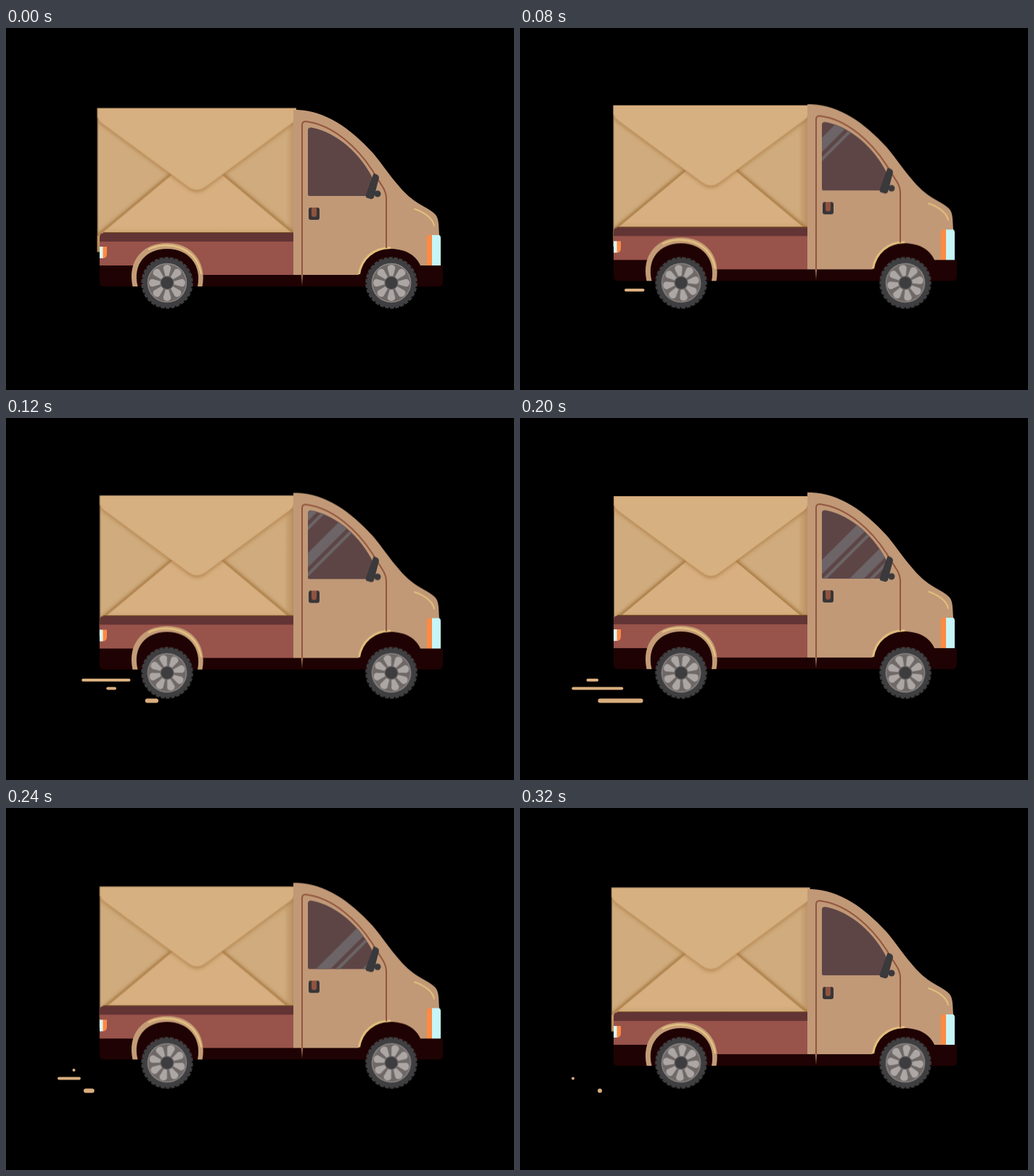
These frames come from a looping animation (700x500 px, 360 ms). An HTML page:

```html
<!DOCTYPE html>
<html lang="en">
<head>
<meta charset="utf-8">
<title>Delivery van</title>
<style>
  html, body { margin: 0; width: 100%; height: 100%; overflow: hidden; background: #000; }
  svg { display: block; width: 700px; height: 500px; }
</style>
</head>
<body>
<svg viewBox="0 0 700 500" fill="none">
  <defs>
    <linearGradient id="side">
      <stop offset="0" stop-color="#d0ab7d"/>
      <stop offset=".95" stop-color="#d0ab7d"/>
      <stop offset="1" stop-color="#b98f60"/>
    </linearGradient>
    <linearGradient id="fold" x2="0" y2="1">
      <stop offset="0" stop-color="#d8b081"/>
      <stop offset=".75" stop-color="#d7af80"/>
      <stop offset="1" stop-color="#b98c55"/>
    </linearGradient>
    <filter id="soft" x="-10%" y="-10%" width="120%" height="130%">
      <feGaussianBlur stdDeviation="2"/>
    </filter>
    <clipPath id="sheet"><path d="M129.500 107H396.500V301H129.500z"/></clipPath>
    <path id="glass" d="M416 141Q416 137 421 137.500C456 144 489 174 506 209L499 232H418Q416 232 416 230z"/>
    <clipPath id="pane"><use href="#glass"/></clipPath>
    <path id="flap" d="M129.500 107H396.500V119Q396 124 390 128L275 213Q263 222 251 213L136 128Q130 124 129.500 119z"/>
    <path id="petal" d="M-2.300 -9.500L-5.300 -20Q-5.500 -24.500 0 -25Q5.500 -24.500 5.300 -20L2.300 -9.500z"/>
  </defs>

  <g id="envelope">
    <g clip-path="url(#sheet)">
      <path d="M129.500 107H396.500V301H129.500z" fill="url(#side)"/>
      <path d="M129.500 279.500L263 168L396.500 279.500" stroke="#9a6a32" stroke-width="4" filter="url(#soft)"/>
      <path d="M263 168L396.500 279.500V301H129.500V279.500z" fill="url(#fold)" stroke="#b1824c"/>
      <use href="#flap" y="3" fill="#a9783f" opacity=".6" filter="url(#soft)"/>
      <use href="#flap" fill="#d7b081" stroke="#c0935f" stroke-width=".8"/>
    </g>
  </g>

  <g id="body">
    <!-- cargo bed and sill -->
    <path d="M129 290H397V341H129z" fill="#98534b"/>
    <path d="M129 295V289Q129 283 135 283H397V295z" fill="#633434"/>
    <path d="M134 282.500H397" stroke="#7a5427"/>
    <path d="M129 328H180V341H490L560 328H602V351Q602 357 596 357H135Q129 357 129 351z" fill="#1f0203"/>
    <path d="M129 302H139V312Q139 318 133 318H129z" fill="#ff8a43"/>
    <path d="M129 302H133.500V318H129z" fill="#d9f7f5"/>
    <!-- rear arch -->
    <path d="M174.500 357C167 323 187 297 222 297C256 297 277 323 270.500 357z" fill="#c49c77"/>
    <path d="M181.500 357C174 327 192 305 222 305C251 305 270 327 264 357z" fill="#1f0203"/>
    <path d="M196 306C222 293 262 301 269 340" stroke="#e4c17f" stroke-width="2.500"/>
    <!-- cab -->
    <path d="M396 113H401C440 114 475 139 505 172C523 193 540 222 562 238C575 247 586 251 592 258C597 264 596 276 597 286L599 328H570V341H396z" fill="#c19977"/>
    <path d="M486 341C490 318 507 305 530 305C550 305 565 314 571 328V345H486z" fill="#1f0203"/>
    <path d="M486.500 340C490 318 507 303.500 530 303.500" stroke="#e2bf7d" stroke-width="3"/>
    <path d="M408 342V134Q408 129 413 129C452 134 485 166 505 197L520 221Q524 228 524 236V304" stroke="#93553f" stroke-width="2"/>
    <path d="M406.800 341H409L408 356z" fill="#a87558"/>
    <path d="M563 250C575 254 588 262 590 273" stroke="#e2c07d" stroke-width="2" stroke-linecap="round"/>
    <path d="M587 286H596Q599 286 599 290V328H587z" fill="#c6f6f8"/>
    <path d="M580 290Q580 286 584 286H587V328H580z" fill="#ff8a43"/>
    <!-- window -->
    <use href="#glass" fill="#5d4546"/>
    <g clip-path="url(#pane)">
      <g id="glare" stroke="#6c6466"></g>
    </g>
    <path d="M506.500 201Q514 202 514 207L507 234Q505 237 502 236L497 234.500Q495 233 496 230z" fill="#3a393b"/>
    <circle cx="512" cy="229" r="4.500" fill="#3a393b"/>
    <rect x="417" y="248" width="15" height="17" rx="3" fill="#383537"/>
    <path d="M421 248H428V258Q428 261 424.500 261Q421 261 421 258z" fill="#91533f"/>
  </g>

  <g id="wheels"></g>
  <g id="trails" fill="#d9ae7e"></g>
</svg>
<script>
const STEP = 40, COUNT = 9;
const byId = id => document.getElementById(id);

function add(parent, tag, attrs) {
  const node = document.createElementNS('http://www.w3.org/2000/svg', tag);
  for (const key in attrs) node.setAttribute(key, attrs[key]);
  return parent.appendChild(node);
}

// Holds one pose per step, with hard changes between them.
function play(node, pose) {
  const frames = Array.from({ length: COUNT + 1 }, (_, i) => ({
    ...pose(Math.min(i, COUNT - 1)), offset: i / COUNT, easing: 'steps(1, end)'
  }));
  node.animate(frames, { duration: STEP * COUNT, iterations: Infinity });
}

function smooth(u) {
  const t = Math.min(1, Math.max(0, u));
  return t * t * (3 - 2 * t);
}

// Quick rise, a pause at the top, then a sharp drop.
const hop = i => i < 4 ? 1 - (1 - i / 4) ** 2 : 1 - ((i - 4) / 4.1) ** 4;

play(byId('body'), i => ({ transform: `translate(0px, ${-10.2 * hop(i)}px)` }));

// The envelope jumps at once, sinks back slowly and swells near the ground.
play(byId('envelope'), i => {
  const sink = (i + COUNT - 1) % COUNT / (COUNT - 1);
  const y = 106.5 + 4 * sink ** 1.5;
  const size = 1 + 0.026 * (1 - hop(i));
  return { transform: `translate(263px, ${y}px) scale(${size}) translate(-263px, -107px)` };
});

// Two reflections, each a wide band led by a thin one.
const glare = byId('glare');
for (const x of [0, -64]) {
  add(glare, 'path', { d: `M${x} 0l-300 300`, 'stroke-width': 14 });
  add(glare, 'path', { d: `M${x + 20} 0l-300 300`, 'stroke-width': 4 });
}
play(glare, i => ({ transform: `translate(${511 + 37 * i}px, 0px)` }));

for (const x of [222, 531]) {
  const hub = add(byId('wheels'), 'g', { transform: `translate(${x} 352)` });
  const wheel = add(hub, 'g', {});
  add(wheel, 'circle', { r: 34, fill: '#3f3f41' });
  add(wheel, 'circle', {
    r: 34.5, stroke: '#3f3f41', 'stroke-width': 2.5, pathLength: 120, 'stroke-dasharray': '3 1'
  });
  add(wheel, 'circle', { r: 26.5, fill: '#6e6866', stroke: '#8b8584', 'stroke-width': 1.5 });
  for (let a = 0; a < 360; a += 45)
    add(wheel, 'use', { href: '#petal', fill: '#aca6a5', transform: `rotate(${a})` });
  add(wheel, 'circle', { r: 8.5, fill: '#3d3d3f' });
  play(wheel, i => ({ transform: `rotate(${i * 360 / COUNT}deg)` }));
}

// The front of a trail shoots left; its back follows the same path after a lag.
function addTrail({ y, size, end, travel, start, lag }) {
  const bar = add(byId('trails'), 'rect', { y: y - size / 2, height: size, rx: size / 2 });
  play(bar, i => {
    const age = i - start;
    const front = smooth(age / 2.7), back = smooth((age - lag) / 2.7);
    return {
      x: `${end + travel * (1 - front)}px`,
      width: `${size + travel * (front - back)}px`,
      opacity: age > 0 && age < 6.5 ? 1 : 0
    };
  });
}
addTrail({ y: 362, size: 4, end: 91.5, travel: 76, start: 1, lag: 2 });
addTrail({ y: 373.5, size: 4, end: 71, travel: 77, start: 2.4, lag: 2 });
addTrail({ y: 390.5, size: 6, end: 107, travel: 97, start: 2.4, lag: 1.4 });
</script>
</body>
</html>
```
